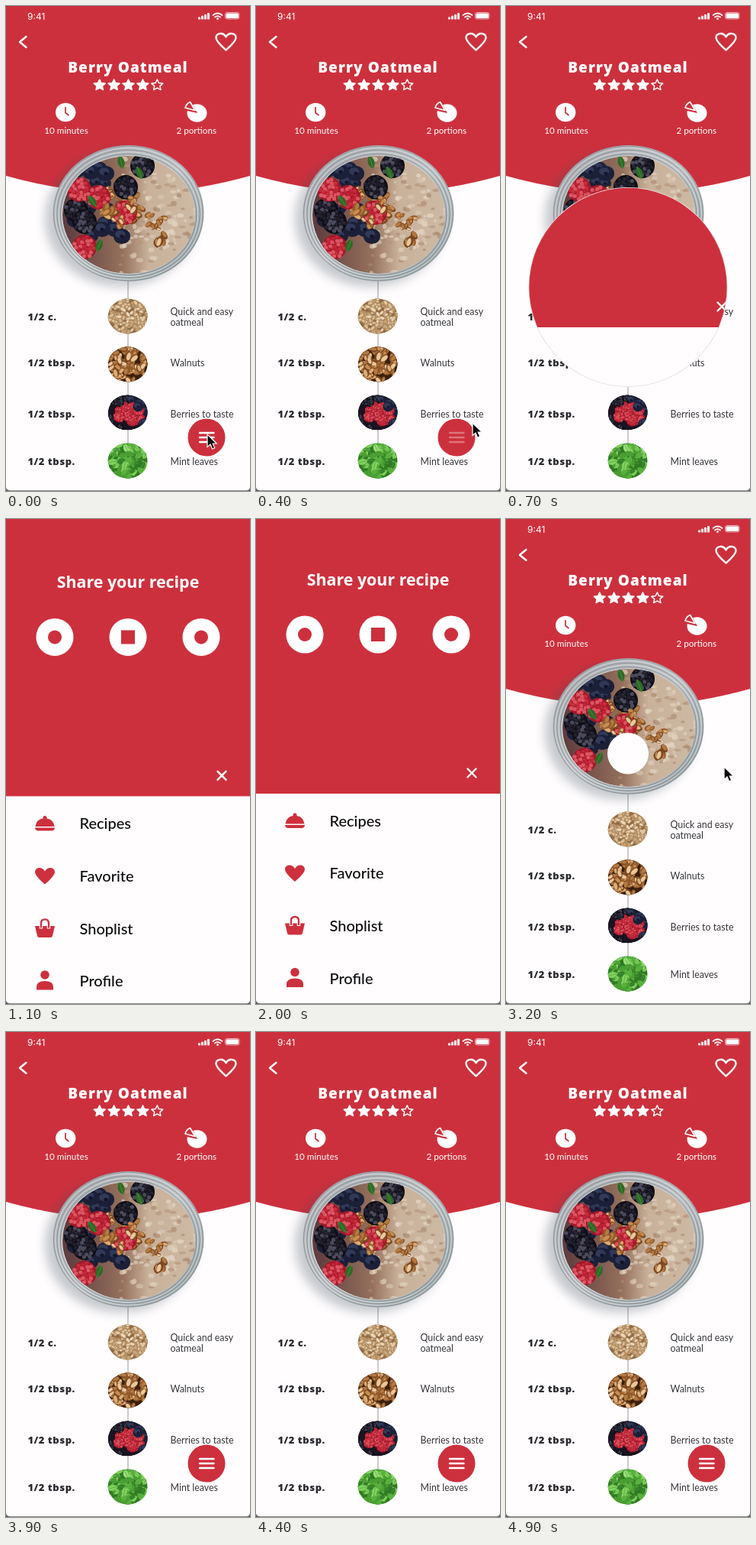
These frames come from a looping animation (320 px wide and 634 px high, 5000 ms). An HTML page:

```html
<!DOCTYPE html>
<html lang="en">
<head>
<meta charset="utf-8">
<title>Berry Oatmeal</title>
<style>
html, body { margin: 0; width: 100%; height: 100%; overflow: hidden; background: #fffdfe; }
svg { display: block; width: 100vw; height: 100vh; }
text { font-family: Lato, "Open Sans", sans-serif; font-size: 12.4px; fill: #35353a; }
.title, .amount, .share { font-family: "Open Sans", Lato, sans-serif; font-weight: 800; }
.title { font-size: 19px; letter-spacing: 1.1px; fill: #fff; }
.share { font-size: 21.4px; font-weight: 700; fill: #fff; }
.amount { font-size: 13px; letter-spacing: .5px; fill: #2b2b30; }
.info { font-size: 11.7px; fill: #fff; }
.time { font-family: Inter, sans-serif; font-size: 12px; fill: #fff; }
.item { font-size: 20px; font-weight: 500; fill: #0b0b0d; }
.mid { text-anchor: middle; }
.red { fill: #cd303d; }
.white { fill: #fff; }
.line { fill: none; stroke: #fff; stroke-width: 2.4; stroke-linecap: round; stroke-linejoin: round; }
.thin { stroke-width: 1.7; }
</style>
</head>
<body>
<svg viewBox="0 0 320 634" preserveAspectRatio="none">
  <defs>
    <clipPath id="hole"><circle id="holeShape" r="0"/></clipPath>
    <clipPath id="food"><ellipse cx="161" cy="273" rx="87" ry="77"/></clipPath>
    <clipPath id="dish"><ellipse rx="26" ry="23"/></clipPath>
    <filter id="soft" x="-30%" y="-30%" width="160%" height="160%"><feGaussianBlur stdDeviation="7"/></filter>
    <linearGradient id="glass" x1="0" y1="0" x2="1" y2="1">
      <stop offset="0" stop-color="#a3a5aa"/><stop offset=".5" stop-color="#c3c6c8"/><stop offset="1" stop-color="#8e9a9d"/>
    </linearGradient>
    <linearGradient id="oat" x1="0" x2="1">
      <stop offset="0" stop-color="#5d3a3e"/><stop offset=".45" stop-color="#94705c"/><stop offset=".65" stop-color="#c9b19a"/><stop offset="1" stop-color="#cdb9a4"/>
    </linearGradient>
  </defs>
  <rect width="320" height="634" fill="#fffdfe"/>
  <g id="recipe"></g>
  <g id="fab">
    <circle class="red" cx="263" cy="564" r="24.5"/>
    <path id="bars" class="line" d="M254 558h18.500M254 564h18.500M254 570h18.500"/>
  </g>
  <circle id="edge" fill="none" stroke="#e6dcde" stroke-width="1.6"/>
  <g clip-path="url(#hole)">
    <rect width="320" height="634" fill="#fffdfe"/>
    <g id="menu">
      <rect id="panel" class="red" y="-641" width="320" height="1000"/>
      <g id="content"></g>
      <path id="close" class="line" d="M277.500 326.500l11 11m0-11l-11 11"/>
    </g>
  </g>
  <path d="M0 629q.5 4 5 4.200H315q4.500 0 5-4.200V634H0Z" fill="#1d1b1d" opacity=".7"/>
  <path id="cursor" d="M0 0V16.500L4 13L6.500 19L9.700 17.600L7.200 12H12.300Z" fill="#050505" stroke="#fff" stroke-width="1.2"/>
</svg>
<script>
const $ = id => document.getElementById(id);
let seed = 7;
const rnd = (a = 0, b = 1) => {
  seed = (seed * 16807) % 2147483647;
  return a + (b - a) * seed / 2147483647;
};
const pick = list => list[Math.floor(rnd(0, list.length))];
const many = (n, fn) => Array.from({ length: n }, (_, i) => fn(i)).join('');
const each = (points, fn, r) => points.map(([x, y]) => fn(x, y, r)).join('');
const text = (cls, x, y, s) => `<text class="${cls}" x="${x}" y="${y}">${s}</text>`;
const oval = (x, y, rx, ry, fill, more = '') =>
  `<ellipse cx="${x}" cy="${y}" rx="${rx}" ry="${ry}" fill="${fill}" ${more}/>`;
const turned = (x, y, inner) =>
  `<g transform="translate(${x} ${y}) rotate(${rnd(0, 360)})">${inner}</g>`;
const HEART = 'M0 10.500C-4 7-13-.5-13-5.500C-13-11.500-4-13.500 0-6.500C4-13.500 13-11.500 13-5.500C13-.5 4 7 0 10.500Z';

function star(i) {
  const pts = many(10, k => {
    const a = k * Math.PI / 5, r = k % 2 ? 3.6 : 7.5;
    return `${122.700 + 18.9 * i + 1.05 * r * Math.sin(a)},${103.5 - r * Math.cos(a)} `;
  });
  return `<polygon points="${pts}" fill="${i < 4 ? '#fff' : 'none'}" stroke="#fff" stroke-width="1.5" stroke-linejoin="round"/>`;
}

// A berry made of small drupelets on a spiral
function berry(x, y, r, base, tones) {
  return oval(x, y, r, r, base) + many(26, i => {
    const a = i * 2.4, d = r * Math.sqrt(i / 26) * .88;
    const px = x + d * Math.cos(a), py = y + d * Math.sin(a);
    return oval(px, py, r * .17, r * .16, pick(tones)) + oval(px - .5, py - .7, .6, .5, tones[0]);
  });
}
const raspberry = (x, y, r) => berry(x, y, r, '#a3182a', ['#dc5562', '#c62a3a', '#b82032']);
const blackberry = (x, y, r) => berry(x, y, r, '#0f0e16', ['#4b4a5c', '#23212e', '#1c1a26']);
const blueberry = (x, y, r) => oval(x, y, r, r * .92, '#1b2038') +
  oval(x - r * .2, y - r * .25, r * .6, r * .45, '#3b4365', 'opacity=".7"') + oval(x, y, r * .25, r * .2, '#12152a');
const chip = (x, y, r, dark, light) =>
  turned(x, y, oval(0, 0, r, r * .62, dark) + oval(-r * .15, -r * .12, r * .75, r * .38, light));
const walnut = (x, y, r) => many(3, () => chip(x + rnd(-r, r) * .6, y + rnd(-r, r) * .5, r * rnd(.5, .8),
  pick(['#7b4720', '#93592a']), pick(['#dcae78', '#c78c50', '#e8c79a', '#b27b43'])));
const leaf = (x, y, r, tones = ['#2c6a27']) =>
  turned(x, y, `<path d="M${-r} 0Q0 ${-r} ${r} 0Q0 ${r} ${-r} 0Z" fill="${pick(tones)}"/><path d="M${-r} 0H${r}" stroke="#5f9a43" stroke-width=".6"/>`);

function bowl() {
  const rings = many(6, i => `<ellipse cx="160.500" cy="${271 + i * .4}" rx="${98 - i * 2.2}" ry="${88 - i * 2.2}" fill="none" stroke="${i % 2 ? '#e1e6e7' : '#7f8b90'}" opacity=".75"/>`);
  const mush = many(170, () => oval(rnd(150, 250), rnd(200, 350), rnd(2, 5), rnd(1.5, 3.5),
    pick(['#e7dac8', '#b5967b', '#d9c7b2', '#a98a70', '#e2d3c0']), 'opacity=".65"'));
  const nuts = n => many(n, () => {
    const x = rnd(95, 208);
    return walnut(x, 242 + .4 * (x - 95) + rnd(-20, 22), rnd(6, 10));
  });
  return oval(150, 278, 99, 89, '#42505c', 'opacity=".3" filter="url(#soft)"') +
    oval(160.5, 271, 99, 89, 'url(#glass)') + rings +
    `<g clip-path="url(#food)">${oval(161, 273, 87, 77, 'url(#oat)')}${mush}` +
    many(14, () => blueberry(rnd(88, 150), rnd(212, 310), rnd(8, 11))) + nuts(20) +
    each([[111, 217], [131, 219], [126, 292], [152, 301]], blueberry, 11) +
    each([[92, 267], [103, 282], [157, 237], [179, 209]], blackberry, 16) +
    each([[96, 240], [103, 315], [121, 250], [156, 270]], raspberry, 16) +
    each([[151, 204], [175, 218], [113, 255], [122, 313]], leaf, 9) + nuts(7) + '</g>';
}

// Ingredient dishes: base colour, number of pieces, one piece
const DISHES = [
  ['#8f6a45', 150, (x, y) => chip(x, y, rnd(3, 5), '#b08a5f', pick(['#ecd9bd', '#dcc09a', '#e3caa8', '#c9a67c']))],
  ['#3a1f0c', 42, (x, y) => walnut(x, y, rnd(6, 9))],
  ['#1b1320', 34, (x, y) => Math.hypot(x - 1, y - 5) < 17 ? raspberry(x, y, 7.5) : (x < 0 ? blackberry : blueberry)(x, y, 7)],
  ['#2f7a22', 90, (x, y) => leaf(x, y, rnd(5, 8), ['#58b53c', '#7fd35d', '#469f30', '#98df78', '#2f7f25'])]
];
function dish([base, n, piece], i) {
  const pieces = many(n, () => piece(rnd(-27, 27), rnd(-24, 24)));
  return `<g transform="translate(159.700 ${405.5 + 63 * i})"><g clip-path="url(#dish)">${oval(0, 0, 26, 23, base)}${pieces}</g></g>`;
}

function ingredients() {
  const names = ['Quick and easy', 'Walnuts', 'Berries to taste', 'Mint leaves'];
  const lines = [410.5, 471, 537.5, 600];
  return DISHES.map(dish).join('') + text('', 215.5, 417.5, 'oatmeal') + names.map((name, i) =>
    text('amount', 28.5, lines[i], i ? '1/2 tbsp.' : '1/2 c.') + text('', 215.5, lines[i] - (i ? 0 : 7), name)).join('');
}

function status() {
  return text('time', 28, 17.7, '9:41') +
    many(4, i => `<rect class="white" x="${252 + i * 4}" y="${14.5 - i * 1.8}" width="3" height="${3 + i * 1.8}" rx=".7"/>`) +
    '<path class="line thin" d="M271.500 12Q277.500 7 283.500 12M274 14.500Q277.500 11.700 281 14.500"/><circle class="white" cx="277.500" cy="16.500" r="1.500"/>' +
    '<rect x="287.500" y="8.500" width="18.500" height="8.500" rx="2.500" fill="none" stroke="#fff" opacity=".6"/><rect class="white" x="288.500" y="9.500" width="16.500" height="6.500" rx="1.500"/>';
}

function recipe() {
  return '<path class="red" d="M0 0H320V222Q160 267 0 222Z"/>' + status() +
    '<path class="line" d="M26.500 40L18 47L26.500 54"/>' +
    `<path class="line" transform="translate(288.500 47)" d="${HEART}"/>` +
    text('title mid', 160, 87, 'Berry Oatmeal') + many(5, star) +
    oval(78.2, 139, 13.2, 12.2, '#fff') + '<path d="M78 132V139.500L82.500 143" fill="none" stroke="#cd303d" stroke-width="1.700"/>' +
    oval(250.5, 140, 13, 11.8, '#fff') + '<path class="red" d="M251 140L233 136L241 122Z"/>' +
    '<path class="line thin" d="M248 136.500L235 133Q236.500 127.500 241.500 125.500Z"/>' +
    text('info mid', 79, 167, '10 minutes') + text('info mid', 249.7, 167, '2 portions') +
    '<path d="M160 358V575" stroke="#99979a"/>' + bowl() + ingredients();
}

function content() {
  const marks = many(3, i => oval(64 + 96 * i, 151, 24.5, 24.5, '#fff') +
    (i === 1 ? '<rect class="red" x="151" y="142" width="18" height="18"/>' : oval(64 + 96 * i, 151, 9, 9, '#cd303d')));
  const icons = '<g class="red"><path d="M38.500 398.500Q40 389 48.500 388Q48 384.500 51 384.500T53.500 388Q62 389 63.500 398.500Z"/><path d="M38 400H64Q63.500 404 60 404H42Q38.500 404 38 400Z"/>' +
    `<path transform="translate(51 463.500)" d="${HEART}"/>` +
    '<path d="M38 528.500H64L61 541.500Q60.500 543.500 58.500 543.500H43.500Q41.500 543.500 41 541.500Z"/>' +
    '<circle cx="51" cy="592.500" r="5.800"/><path d="M40 612V608Q40 600.500 51 600.500T62 608V612Z"/></g>' +
    '<path id="handle" d="M46 532V525Q46 519.500 51 519.500T56 525V532" fill="none" stroke="#fffdfe" stroke-width="4.500"/>' +
    '<use href="#handle" style="stroke:#cd303d"/><path d="M46 531V525Q46 520 51 520T56 525V531" fill="none" stroke="#cd303d" stroke-width="2.300"/>';
  return text('share mid', 160, 87, 'Share your recipe') + marks + icons.replace('<use href="#handle" style="stroke:#cd303d"/>', '') +
    ['Recipes', 'Favorite', 'Shoplist', 'Profile'].map((s, i) => text('item', 96.5, 401.5 + i * 68.8, s)).join('');
}

$('recipe').innerHTML = recipe();
$('content').innerHTML = content();

const ramp = (t, from, to) => Math.min(1, Math.max(0, (t - from) / (to - from)));
const mix = (a, b, u) => a + (b - a) * u;

// The menu hole grows, stays open, then shrinks, all exponentially
function radius(t) {
  if (t < 500) return 0;
  const opening = 24.5 * Math.exp((t - 500) / 120);
  const closing = 32 * Math.exp((3200 - t) / 62) - 5;
  return Math.max(0, Math.min(500, opening, closing));
}
// Leaves the button, comes back to the cross, leaves again
function cursor(t) {
  if (t < 1500) {
    const out = ramp(t, 200, 600) ** 2;
    return [264 + 80 * out, 560 - 60 * out];
  }
  const far = (1 - ramp(t, 1900, 2700)) ** 2, leave = ramp(t, 3000, 3600);
  return [284 + 50 * far + 55 * leave ** 3, 329 + 95 * far - 15 * leave];
}
const set = (id, attrs) => Object.entries(attrs).forEach(([k, v]) => $(id).setAttribute(k, v));
const move = (x, y) => ({ transform: `translate(${x} ${y})` });

function render(now) {
  const t = Math.floor((now % 5000) / 100) * 100;
  const shift = 61 * Math.exp((700 - t) / 139);
  const hole = { cx: mix(263, 160, ramp(t, 500, 700)), cy: 306.5 + shift, r: radius(t) };
  const size = 1 - ramp(t, 400, 500) + ramp(t, 3400, 3800);
  const press = ramp(t, 2700, 3000), closing = ramp(t, 3000, 3100);
  set('holeShape', hole);
  set('edge', { ...hole, opacity: hole.r > 30 ? 1 : 0 });
  set('menu', move(0, shift));
  set('panel', move(0, -95 * ramp(t, 3000, 3200)));
  set('content', { opacity: ramp(t, 700, 1050) - closing });
  set('close', { opacity: 1 - closing });
  $('close').style.stroke = `rgb(${mix(255, 140, press)},${mix(255, 105, press)},${mix(255, 105, press)})`;
  set('fab', { transform: `translate(${263 * (1 - size)} ${564 * (1 - size)}) scale(${size})` });
  set('bars', { opacity: 1 - ramp(t, 200, 500) + ramp(t, 3500, 3800) });
  set('cursor', move(...cursor(t)));
}
function tick(now) {
  render(now);
  requestAnimationFrame(tick);
}
render(0);
requestAnimationFrame(tick);
</script>
</body>
</html>
```
